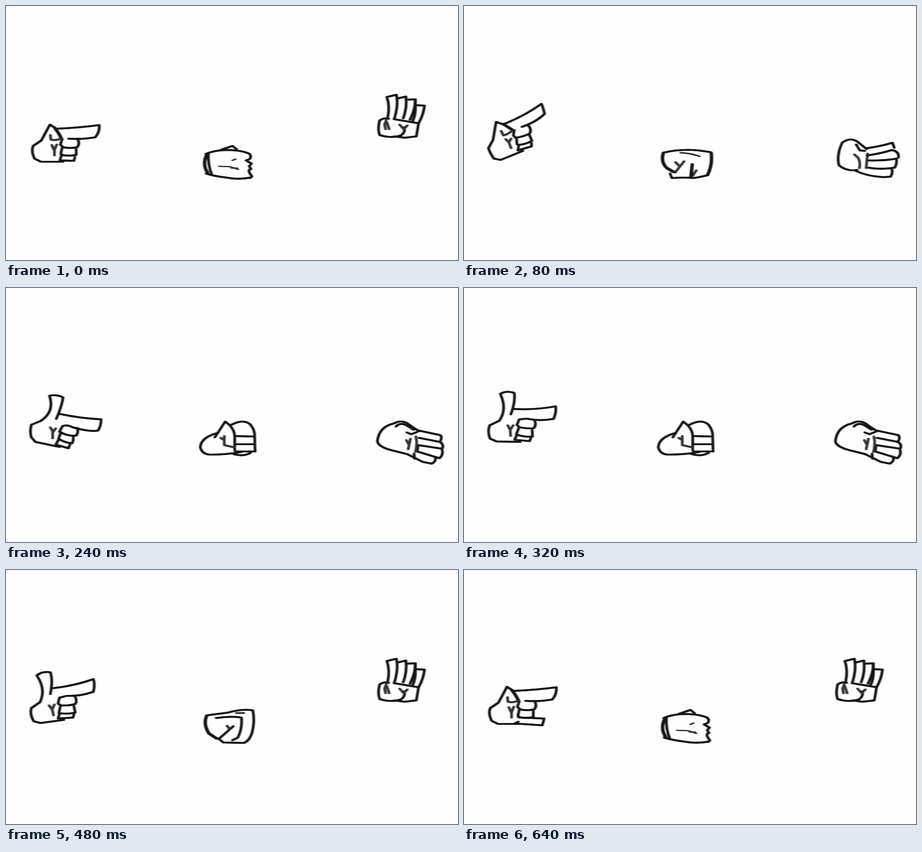
An HTML page for the animation above (720 ms loop, 998x561 px).

```html
<!DOCTYPE html>
<html lang="en">
<head>
<meta charset="utf-8">
<title>Hands</title>
<style>
html, body { margin: 0; width: 100%; height: 100%; overflow: hidden; background: #fefefe; }
svg { display: block; width: 100%; height: 100%; }
path { fill: none; stroke: #151515; stroke-width: 4; stroke-linecap: round; stroke-linejoin: round; }
.bold { stroke-width: 5.5; }
.fine { stroke-width: 2.6; }
.mark { stroke: #333; }
.pose { display: none; }
.pose.on { display: inline; }
</style>
</head>
<body>
<svg viewBox="0 0 998 561">
<defs>
  <!-- A brush that is wider than tall -->
  <filter id="ink" filterUnits="userSpaceOnUse" x="0" y="0" width="998" height="561" color-interpolation-filters="sRGB">
    <feOffset in="SourceGraphic" dx="-1" result="west"/>
    <feOffset in="SourceGraphic" dx="1" result="east"/>
    <feMerge><feMergeNode in="west"/><feMergeNode in="east"/></feMerge>
    <feGaussianBlur stdDeviation="1.1 .5"/>
  </filter>
  <g id="gun">
    <path d="M113 271Q160 269 206 263Q207 279 197 290Q168 295 138 293"/>
    <path d="M78 297L97 262L111 271M78 297L60 309Q55 321 63 337L77 344H126"/>
    <path class="bold" d="M108 270Q117 281 122 292"/>
    <path class="mark" d="M98 285L99 295Q110 298 121 293M101 307L106 318M112 306L107 318V330"/>
    <path d="M124 294L120 306L126 312Q142 315 157 312Q164 304 158 294"/>
    <path d="M124 313L121 326L125 329M155 316L155 329Q140 332 122 329"/>
  </g>
</defs>
<g filter="url(#ink)">
  <!-- left hand -->
  <g class="pose" id="point">
    <use href="#gun"/>
    <path d="M122 331L119 341L150 342L152 334"/>
  </g>
  <g class="pose" id="pinky">
    <use href="#gun" x="-2" y="-4"/>
    <path d="M124 326L177 328L173 343L112 339L120 335"/>
  </g>
  <g class="pose" id="raise">
    <path d="M90 260Q135 242 171 216Q175 225 178 238Q160 256 128 267"/>
    <path d="M64 296L71 256L88 262M64 296L54 314Q58 326 66 337L81 340L130 320"/>
    <path class="bold" d="M87 261L106 273"/>
    <path class="mark" d="M82 276L87 286Q98 283 107 275M92 294L99 301M104 293L99 301L104 314"/>
    <path d="M111 274L109 286L114 291Q130 289 145 282Q150 272 142 264"/>
    <path d="M116 292L117 305M145 286L150 298Q135 306 119 307"/>
    <path d="M121 308L119 319L149 310L149 303"/>
  </g>
  <g class="pose" id="thumb">
    <path d="M75 292Q89 264 68 233Q80 223 98 226Q104 244 98 274"/>
    <path d="M104 261Q150 256 193 241Q197 252 193 269Q165 279 133 278"/>
    <path d="M75 292L56 305Q52 318 61 334L76 338L128 331"/>
    <path class="mark" d="M95 299L102 308M107 297L102 308L105 321"/>
    <path d="M130 279L118 282L115 295L121 299Q140 300 153 296Q158 288 152 279"/>
    <path d="M120 301L117 315M150 301L153 315Q135 319 117 316"/>
    <path d="M118 318L115 328L148 326L150 319"/>
  </g>
  <g class="pose" id="thumbUp">
    <path d="M62 296Q72 252 41 241Q52 225 66 225Q79 236 84 271"/>
    <path d="M84 257Q130 237 163 208Q169 218 171 230Q155 252 120 264"/>
    <path d="M62 296L53 314Q58 327 67 337L83 338L131 316"/>
    <path class="mark" d="M89 292L98 299M103 290L97 299L102 311"/>
    <path d="M120 264L107 270L109 284L114 287Q130 284 145 275Q146 265 140 259"/>
    <path d="M115 289L116 302M142 279L148 293Q133 301 118 303"/>
    <path d="M119 304L117 315L148 306L148 299"/>
  </g>
  <g class="pose" id="thumbDown">
    <path d="M76 294Q108 274 96 238Q113 234 126 242Q123 262 111 289"/>
    <path d="M118 278Q165 288 210 290Q210 305 203 315Q185 318 148 308"/>
    <path d="M76 294L56 302Q52 317 56 330L65 340L118 351"/>
    <path class="mark" d="M98 308L104 318M110 310L103 319V332"/>
    <path d="M148 308Q135 301 125 305L118 317Q135 328 155 326Q161 318 157 309"/>
    <path d="M121 319L116 333Q130 342 146 343Q150 335 148 328"/>
    <path d="M116 335L110 346L138 354L141 346"/>
  </g>
  <!-- middle hand -->
  <g class="pose" id="back">
    <path d="M441 327Q460 318 493 318Q520 319 537 326Q543 332 538 338L530 341L542 348L537 354L541 360Q531 362 543 376L539 380"/>
    <path d="M447 325Q445 350 455 374M474 318L500 309L509 316"/>
    <path class="bold" d="M443 329Q433 350 445 368"/>
    <path d="M442 370Q460 376 487 379Q512 384 540 379"/>
    <path class="mark fine" d="M470 354L495 355L513 361M498 358H511M500 341L507 338"/>
  </g>
  <g class="pose" id="front">
    <path d="M440 324Q490 312 545 323M455 370L459 380Q485 378 507 380Q525 377 537 374"/>
    <path class="bold" d="M440 325Q434 345 448 358L462 366M546 325Q549 350 538 373"/>
    <path class="mark" d="M467 345L475 353M486 343L466 368M513 363L505 375"/>
    <path class="bold" d="M504 350L501 377"/>
    <path class="fine" d="M478 324Q500 325 520 332"/>
  </g>
  <g class="pose" id="side">
    <path d="M436 327Q455 319 474 312Q495 302 512 301L542 306Q548 335 543 369L512 371Q480 370 443 366Q434 345 436 327"/>
    <path d="M447 330L462 319M445 366L467 364"/>
    <path d="M515 303Q520 335 507 364M524 320L513 368"/>
    <path class="mark" d="M483 332L491 345M495 325L491 361H508"/>
  </g>
  <g class="pose" id="fist">
    <path d="M468 320Q430 330 429 352Q433 367 450 368Q490 368 520 362"/>
    <path d="M461 330L484 295L494 303Q505 315 505 328V358"/>
    <path d="M498 302Q525 288 540 302Q550 315 549 328L505 327M549 328L550 361"/>
    <path d="M508 345H549M506 361H550M503 367Q525 373 540 364"/>
    <path class="mark" d="M474 331L482 336M482 327V347L504 352"/>
  </g>
  <g class="pose" id="roll">
    <path d="M469 320Q436 328 434 350Q437 368 455 368H505"/>
    <path d="M465 330L489 295L503 305Q515 318 513 340L508 356"/>
    <path d="M506 308L537 307Q545 314 544 345L541 357L488 355"/>
    <path d="M508 358L503 373L537 375L541 358M505 367H538"/>
    <path class="mark" d="M482 332L488 340M490 326V354M512 325L516 335L522 321"/>
  </g>
  <g class="pose" id="turn">
    <path d="M443 321L490 315Q520 306 545 310Q550 335 543 360Q537 378 525 382L480 381L470 373L502 345"/>
    <path class="bold" d="M443 322Q435 340 448 361L465 372"/>
    <path d="M464 327Q495 322 520 326Q522 350 512 370L500 376"/>
    <path class="mark" d="M488 344L494 352M509 316H525"/>
  </g>
  <!-- right hand -->
  <g class="pose" id="open">
    <path d="M843 245Q848 222 841 201L862 196Q867 220 857 250"/>
    <path d="M866 204L883 200Q886 225 877 248M885 207L903 206Q905 225 892 251"/>
    <path d="M904 206V219Q905 240 898 254M904 219L924 220Q922 240 911 259"/>
    <path d="M845 249Q835 246 825 253Q820 272 825 285Q850 293 872 286Q883 278 879 268"/>
    <path d="M857 250L911 259L906 288L880 291L858 288"/>
    <path class="mark" d="M840 251L836 262L838 272M841 257L846 272M869 262L878 272L886 264"/>
  </g>
  <g class="pose" id="swing">
    <path d="M889 316L873 303Q855 287 835 302Q822 330 828 352Q845 366 868 362"/>
    <path d="M866 306L874 319L885 320"/>
    <path class="mark" d="M862 328L870 335Q876 345 873 358M891 326L888 358"/>
    <path d="M889 314Q920 310 946 302L950 313M890 330Q920 326 945 318Q962 322 959 335"/>
    <path d="M892 341Q930 342 955 337Q956 350 951 357Q920 362 893 357"/>
    <path d="M865 364Q890 376 925 378L942 377Q948 366 944 359"/>
  </g>
  <g class="pose" id="flat">
    <path d="M912 316Q898 308 885 298Q870 291 857 299Q824 306 820 338Q821 350 850 358L886 367"/>
    <path d="M861 306Q870 296 884 303L900 313M885 319L895 323L910 317"/>
    <path class="mark" d="M884 336L889 345M893 333L888 356M905 328Q909 345 904 362"/>
    <path d="M912 315L959 325Q964 330 958 340L912 331M958 340Q968 346 963 355L910 347"/>
    <path d="M910 347L908 361L957 376Q966 368 963 358M886 367L920 384L940 388Q950 383 948 375M901 366L902 377"/>
  </g>
</g>
</svg>
<script>
const STEP = 40, LOOP = 720;

// Start slot and pose for each hand; optional turn in degrees and shift
const left = [
  [0, 'point'], [1, 'point', -10, -2, -2], [2, 'raise'], [3, 'point', -10, -3, -3],
  [4, 'point', -3.5, 0, -3], [5, 'thumb', 12, -5, 1], [6, 'thumbDown'],
  [8, 'thumb', 9, -5, 1], [9, 'thumb', -7, 2, 0], [10, 'thumbUp'],
  [11, 'thumb', -8, 2, 0], [12, 'thumb'], [13, 'point', -4, 0, -2],
  [14, 'point', 1.5], [15, 'point', 0, -1, -2], [16, 'pinky']
];
const middle = [
  [0, 'back'], [1, 'front'], [3, 'turn'], [4, 'side'], [5, 'roll'], [6, 'fist'],
  [10, 'roll'], [11, 'side'], [12, 'turn'], [13, 'front'], [15, 'back']
];
const right = [
  [0, 'open'], [1, 'swing', -30], [2, 'swing'], [3, 'flat'], [11, 'swing'], [12, 'open']
];
const hands = [
  { track: left, pivot: '77 342' },
  { track: middle, pivot: '490 345' },
  { track: right, pivot: '850 330' }
];

function show(hand, slot) {
  const key = hand.track.findLast(k => k[0] <= slot);
  if (key === hand.key) return;
  if (hand.el) hand.el.classList.remove('on');
  const [, id, turn = 0, x = 0, y = 0] = hand.key = key;
  hand.el = document.getElementById(id);
  hand.el.setAttribute('transform', `translate(${x} ${y}) rotate(${turn} ${hand.pivot})`);
  hand.el.classList.add('on');
}

const start = performance.now();
function draw(now) {
  const slot = Math.floor(Math.max(0, now - start) % LOOP / STEP);
  hands.forEach(hand => show(hand, slot));
  requestAnimationFrame(draw);
}
draw(start);
</script>
</body>
</html>
```
